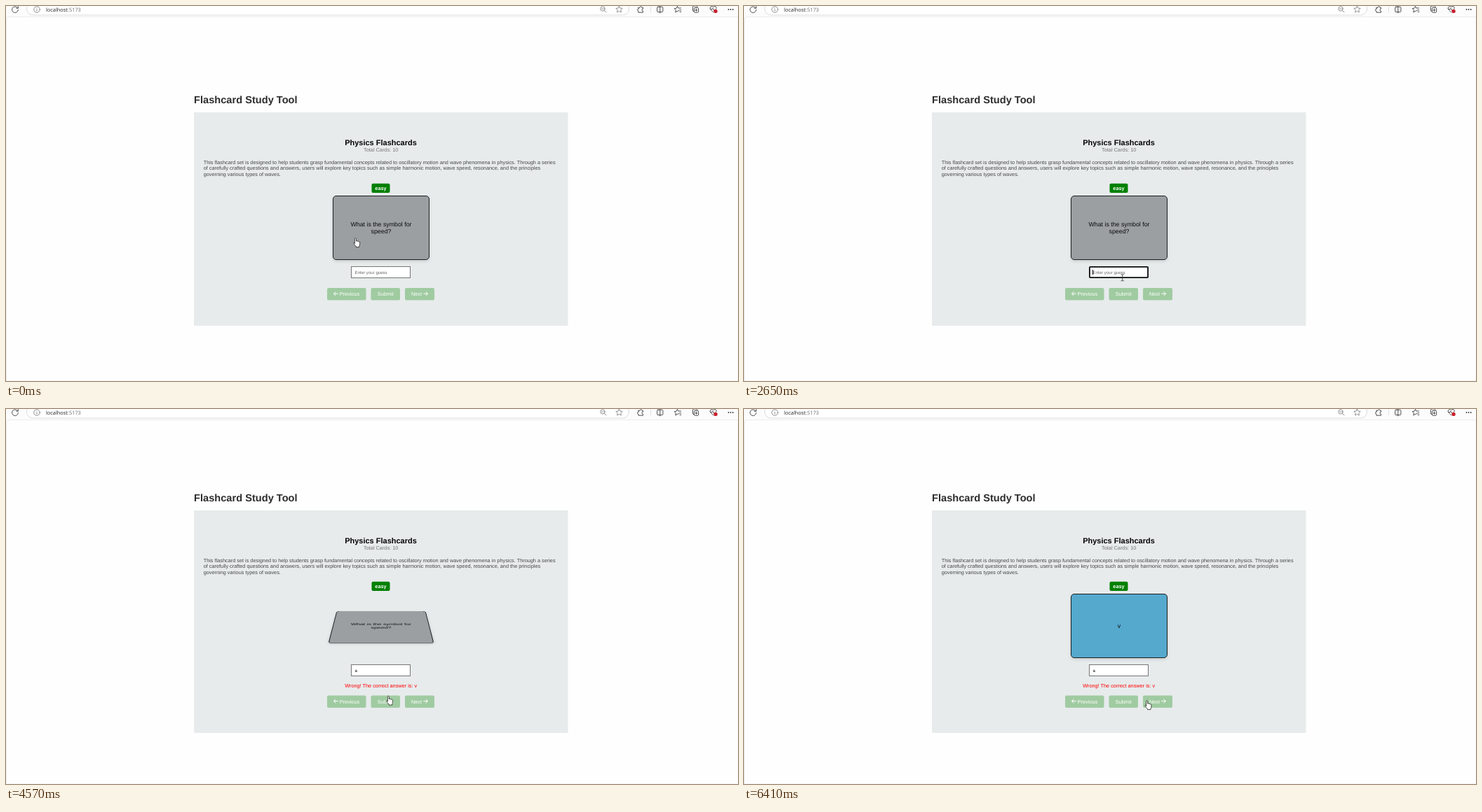
Animation of 1044x536 px, one loop 8 s. Source, as an HTML page:

```html
<!DOCTYPE html>
<html lang="en">
<head>
<meta charset="utf-8">
<title>Flashcard Study Tool</title>
<style>
  html, body { margin: 0; width: 100%; height: 100%; overflow: hidden; background: #fefefe; }
  #stage { position: relative; width: 1044px; height: 536px; overflow: hidden; }
  svg { position: absolute; left: 0; top: 0; display: block; }
  text, #card { font-family: "Liberation Sans", Arial, sans-serif; text-rendering: geometricPrecision; }
  .body { font-size: 7.32px; }
  .mid { text-anchor: middle; }
  .bold { font-weight: bold; }
  .icon { fill: none; stroke: #3c3c3c; stroke-width: .9; stroke-linecap: round; stroke-linejoin: round; }
  .soft { stroke: #777; stroke-width: .8; }
  #card {
    position: absolute; left: 466px; top: 271px; width: 138px; height: 92px; box-sizing: border-box;
    border: 1px solid #1c1f20; border-radius: 5px; box-shadow: 0 2px 4px rgba(0, 0, 0, .13);
    display: flex; align-items: center; justify-content: center; text-align: center;
    font-size: 8.8px; line-height: 10.1px; color: #0c0c0c; white-space: pre;
  }
</style>
</head>
<body>
<div id="stage">
  <svg width="1044" height="536" viewBox="0 0 1044 536">
    <rect width="1044" height="536" fill="#fcfcfc"/>
    <path d="M.5 536V20q0-4.500 4.500-4.500H1044V536z" fill="#fefefe" stroke="#ececec"/>
    <rect x="29.500" y="-5" width="859" height="18" rx="9" fill="#fff" stroke="#dcdcdc"/>

    <g class="icon">
      <path d="M16.800 3A4.400 4.400 0 1 0 17.400 5.500M17.300.6V3.200H14.700"/>
      <g class="soft">
        <circle cx="44" cy="5" r="4.300"/>
        <path d="M44 4.700V7.200M44 2.900V3"/>
        <circle cx="851" cy="4" r="3.200"/>
        <path d="M853.400 6.400L856 9M849.600 4H852.400"/>
        <path id="star" d="M874.500 0L875.900 3 879.200 3.400 876.800 5.700 877.400 9 874.500 7.400 871.600 9 872.200 5.700 869.800 3.400 873.100 3Z"/>
      </g>
      <path d="M902 2.300H904a1.500 1.500 0 0 1 3 0H908.500V4.200a1.500 1.500 0 0 0 0 3V9.200H902V7.200a1.500 1.500 0 0 1 0-3z"/>
      <path d="M919.500 1V9" stroke="#ddd"/>
      <rect x="928.700" y="1.200" width="8.200" height="7.400" rx="1.300"/>
      <path d="M932.800 0V10"/>
      <path d="M959.500 6.600L957 7.600 954.800 9 955.300 5.800 953.200 3.700 956.100 3.200 957.500.4 958.800 3H962.600M960.500 5.800H962.800M961 8.300H962.800"/>
      <path d="M981 7.600Q979.400 7.600 979.400 6V1.500Q979.400 0 981 0H984.500Q986 0 986 1.500"/>
      <rect x="981.300" y="2.400" width="6.300" height="6.900" rx="1.400"/>
      <path d="M984.400 4.300V7.500M982.900 5.900H986"/>
      <path d="M1008.600 8.800L1004.800 5A2.400 2.400 0 0 1 1008.600 1.500 2.400 2.400 0 0 1 1012.800 4.200M1005 4.600H1007L1008 3.200 1009.300 5.800"/>
    </g>
    <circle cx="1012" cy="7.400" r="2.700" fill="#c8202c"/>
    <g fill="#333"><circle cx="1030.500" cy="5" r=".9"/><circle cx="1033.600" cy="5" r=".9"/><circle cx="1036.700" cy="5" r=".9"/></g>
    <text x="57" y="7.500" style="font:7.4px 'Open Sans','Noto Sans',sans-serif" fill="#222">localhost<tspan fill="#6b6b6b">:5173</tspan></text>

    <rect id="panel" x="268" width="533.500" fill="#e7ebec"/>
    <g id="upper">
      <text class="bold" x="268" y="139" font-size="14.640" fill="#2d2d2d">Flashcard Study Tool</text>
      <text class="bold mid" x="534.500" y="198.500" font-size="11" fill="#050505">Physics Flashcards</text>
      <text class="body mid" x="534.700" y="208" fill="#777">Total Cards: 10</text>
      <g class="body" fill="#474747">
        <text x="281.700" y="225.700">This flashcard set is designed to help students grasp fundamental concepts related to oscillatory motion and wave phenomena in physics. Through a series</text>
        <text x="281.700" y="234.300">of carefully crafted questions and answers, users will explore key topics such as simple harmonic motion, wave speed, resonance, and the principles</text>
        <text x="281.700" y="242.800">governing various types of waves.</text>
      </g>
      <rect x="521.500" y="253.800" width="26" height="13.200" rx="2" fill="#008000"/>
      <text class="body bold mid" x="534.500" y="262.800" fill="#fff">easy</text>
      <rect id="field" fill="#fff"/>
      <text id="guess" x="497.600" y="382.800" font-size="6.100"></text>
      <rect id="caret" y="377" width="1" height="7" fill="#111"/>
    </g>
    <text id="verdict" class="body mid" x="534.700" y="398.300" fill="#f00">Wrong! The correct answer is: v</text>
    <g id="buttons">
      <g fill="#a0cba1">
        <rect x="458" y="403" width="55.500" height="17.500" rx="2"/>
        <rect x="520.500" y="403" width="41.500" height="17.500" rx="2"/>
        <rect x="569" y="403" width="42" height="17.500" rx="2"/>
      </g>
      <g class="body" fill="#fff">
        <text x="475.700" y="414.300">Previous</text>
        <text class="mid" x="541.200" y="414.300">Submit</text>
        <text x="577.900" y="414.300">Next</text>
      </g>
      <path d="M473.700 411.200H467.500M470.300 408.400L467.500 411.200 470.300 414M595.300 411.200H601.500M598.700 408.400L601.500 411.200 598.700 414" fill="none" stroke="#fff"/>
    </g>
  </svg>
  <div id="card"></div>
  <svg width="1044" height="536" viewBox="0 0 1044 536">
    <path id="pointer" stroke-linejoin="round"/>
  </svg>
</div>
<script>
  const LOOP = 8000, SUBMIT = 4450, FLIP = 4440, FOCUS = 460, TYPED = 3340;
  const $ = id => document.getElementById(id);
  const set = (id, attrs) => { for (const k in attrs) $(id).setAttribute(k, attrs[k]); };

  // the screen only refreshes at these moments
  const ticks = [0, 310, 460, 860, 990, 1120, 1540, 2070, 2650, 3220, 3340, 3770, 3920,
    4450, 4570, 4690, 4810, 4960, 5110, 6140, 6260, 6410];

  const shapes = {
    hand: { d: "M2.400 8.600V1.700a1 1 0 0 1 2 0V5.200a1 1 0 0 1 1.900.3 1 1 0 0 1 1.700.5 1 1 0 0 1 1.600.9V9.600c0 1.200-.6 2-.9 2.800V13.600H4.200V12.700C3.200 11.600 1.600 9.700.7 8.400c-.4-.8.5-1.500 1.100-.9z",
      fill: "#fff", stroke: "#222", "stroke-width": .8 },
    arrow: { d: "M.5.5V9.300L2.600 7.400 3.900 10.400 5.200 9.900 3.900 6.900H6.700Z",
      fill: "#fff", stroke: "#111", "stroke-width": .7 },
    beam: { d: "M.3.5H1.600Q2.500.5 2.500 1.300 2.500.5 3.400.5H4.700M2.500 1.300V8.700M.3 9.500H1.600Q2.500 9.500 2.500 8.700 2.500 9.500 3.400 9.500H4.700",
      fill: "none", stroke: "#333", "stroke-width": .8 }
  };

  // time, shape, left, top
  const moves = [
    [0, "hand", 495, 331], [310, "hand", 516, 362], [460, "beam", 533, 378],
    [860, "beam", 535, 380], [1120, "beam", 537.2, 383.3], [3770, "arrow", 542, 400],
    [3920, "hand", 542, 409.5], [6140, "hand", 552, 411], [6260, "arrow", 569, 415],
    [6410, "hand", 571.3, 416]
  ];
  const blinks = [460, 990, 1540, 2070, 2650, 3220, 3340, 3920];

  const bez = (a, b, u) => 3 * a * u * (1 - u) ** 2 + 3 * b * u * u * (1 - u) + u ** 3;
  function ease(x) {
    if (x <= 0 || x >= 1) return x <= 0 ? 0 : 1;
    let lo = 0, hi = 1;
    for (let i = 0; i < 24; i++) {
      const m = (lo + hi) / 2;
      if (bez(.25, .25, m) < x) lo = m; else hi = m;
    }
    return bez(.1, 1, lo);
  }

  function drawCard(t, shift) {
    const angle = 180 * ease((t - FLIP) / 600), back = angle > 90, card = $("card");
    const tilt = back ? angle - 180 : angle;
    const label = back ? "v" : "What is the symbol for\nspeed?";
    if (card.textContent !== label) card.textContent = label;
    card.style.background = back ? "#55a9cd" : "#9b9fa1";
    card.style.transform = `translateY(${shift}px)` +
      (tilt ? ` perspective(457.5px) rotateX(${tilt}deg)` : "");
  }

  function render(now) {
    const clock = now % LOOP;
    const t = ticks.filter(k => k <= clock).pop();
    const done = t >= SUBMIT, typed = t >= TYPED;
    const focus = t >= FOCUS && !done, shift = done ? -7 : 0;

    set("panel", { y: 152 + shift, height: done ? 318 : 305 });
    set("upper", { transform: `translate(0 ${shift})` });
    set("buttons", { transform: `translate(0 ${done ? 6.4 : 0})` });
    set("verdict", { visibility: done ? "visible" : "hidden" });

    const line = focus ? 1.8 : 1, inset = line / 2;
    set("field", { x: 492 + inset, y: 372 + inset, width: 85 - line, height: 17 - line,
      rx: focus ? 1 : 0, stroke: focus ? "#0c0c0c" : "#767676", "stroke-width": line });
    $("guess").textContent = typed ? "a" : "Enter your guess";
    set("guess", { fill: typed ? "#000" : "#666" });
    const lit = blinks.filter(k => k <= t).length % 2 === 1;
    set("caret", { x: typed ? 500.5 : 497, visibility: focus && lit ? "visible" : "hidden" });

    drawCard(t, shift);
    const [, shape, x, y] = moves.filter(m => m[0] <= t).pop();
    set("pointer", { ...shapes[shape], transform: `translate(${x} ${y})` });
  }

  const start = performance.now();
  function loop() {
    render(performance.now() - start);
    requestAnimationFrame(loop);
  }
  loop();
</script>
</body>
</html>
```
